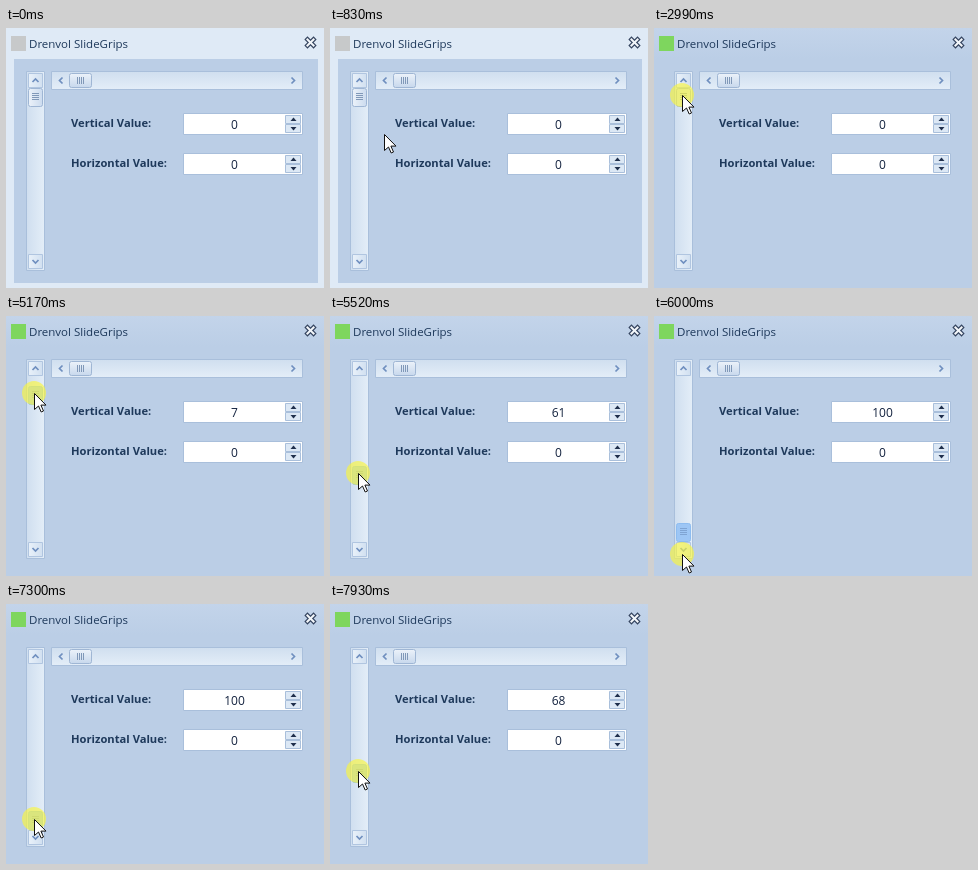
These frames come from a looping animation (318 by 260 pixels, 8 s). An HTML page with a canvas:

```html
<!DOCTYPE html>
<html lang="en">
<head>
<meta charset="utf-8">
<title>Scroll bar demo</title>
<style>
html, body { margin: 0; width: 100%; height: 100%; overflow: hidden; background: #bbcee6; }
canvas { display: block; }
</style>
</head>
<body>
<canvas id="stage" width="318" height="260"></canvas>
<script>
const ctx = document.getElementById('stage').getContext('2d');
const LOOP = 8000, ACTIVATE = 2990, DRAG = 5170;
const THUMB_MIN = 60, TRAVEL = 147;
const FONT = '"Open Sans", "Noto Sans", sans-serif';
const linear = p => p;
const easeOut = p => p * (2 - p);

// Pointer moves: first and last step time, step count, from, to, easing
const moves = [
  [270, 1040, 12, [299, 255], [34, 95], easeOut],
  [1110, 1180, 2, [30, 88], [28, 84], linear],
  [1510, 1650, 3, [28, 78], [28, 68], linear],
  [5170, 5870, 11, [28, 78], [28, 237], linear],
  [6000, 6210, 4, [28, 239], [28, 241], linear],
  [6610, 7300, 10, [28, 241], [28, 216], linear],
  [7370, 7930, 9, [28, 211], [28, 168], linear]
];

function pointerAt(t) {
  const move = moves.filter(m => m[0] <= t).pop();
  if (!move) return null;
  const [start, end, count, from, to, ease] = move;
  const step = Math.floor((t - start) / (end - start) * (count - 1) + 1e-6);
  const p = ease(Math.min(1, step / (count - 1)));
  return from.map((v, i) => Math.round(v + (to[i] - v) * p));
}

function rect(x, y, w, h, fill) {
  ctx.fillStyle = fill;
  ctx.fillRect(x, y, w, h);
}

function framed(x, y, w, h, fill, line, radius = 0) {
  ctx.beginPath();
  ctx.roundRect(x + .5, y + .5, w - 1, h - 1, radius);
  ctx.fillStyle = fill;
  ctx.fill();
  ctx.strokeStyle = line;
  ctx.lineWidth = 1;
  ctx.stroke();
}

function polyline(points, color, width) {
  ctx.beginPath();
  points.forEach(([x, y]) => ctx.lineTo(x, y));
  ctx.strokeStyle = color;
  ctx.lineWidth = width;
  ctx.stroke();
}

function text(str, x, y, size, color, weight = 400, align = 'left') {
  ctx.font = `${weight} ${size}px ${FONT}`;
  ctx.textAlign = align;
  ctx.fillStyle = color;
  ctx.fillText(str, x, y);
}

function gradient(x0, y0, x1, y1, from, to) {
  const g = ctx.createLinearGradient(x0, y0, x1, y1);
  g.addColorStop(0, from);
  g.addColorStop(1, to);
  return g;
}

function chevron(x, y, angle) {
  ctx.save();
  ctx.translate(x, y);
  ctx.rotate(angle);
  polyline([[-3, 1.5], [0, -1.5], [3, 1.5]], '#6f8fbf', 1.7);
  ctx.restore();
}

function verticalBar(thumbY, hover, pressed) {
  framed(20, 43, 19, 200, gradient(20, 0, 39, 0, '#cfdeef', '#e4eef8'), '#a9bfdb');
  const button = gradient(22, 0, 37, 0, '#eaf2fa', '#d0dff0');
  framed(22, 45, 15, 15, button, '#b0c5e0');
  framed(22, 226, 15, 15, button, '#b0c5e0');
  chevron(29.5, 52.5, 0);
  chevron(29.5, 233.5, Math.PI);
  const fill = pressed ? '#9dc6f5' : hover ? '#d0e0f3' : gradient(22, 0, 37, 0, '#edf3fa', '#cadaee');
  framed(22, thumbY, 15, 19, fill, pressed ? '#8dbcf0' : '#9fb6d4', 2);
  for (let i = 0; i < 4; i++) {
    rect(26, thumbY + 5 + i * 2, 7, 1, pressed ? '#7fa4d3' : '#8098b8');
  }
}

function horizontalBar() {
  framed(45, 43, 252, 19, gradient(0, 43, 0, 62, '#cfdeef', '#e4eef8'), '#a9bfdb');
  chevron(55, 52.5, -Math.PI / 2);
  chevron(287, 52.5, Math.PI / 2);
  framed(63, 45, 23, 15, gradient(0, 45, 0, 60, '#edf3fa', '#c6d7ec'), '#9fb6d4', 2);
  for (let i = 0; i < 4; i++) {
    rect(71 + i * 2, 49, 1, 7, '#8098b8');
  }
}

function triangle(x, y, dir) {
  ctx.beginPath();
  ctx.moveTo(x - 3, y + 1.5 * dir);
  ctx.lineTo(x + 3, y + 1.5 * dir);
  ctx.lineTo(x, y - 2 * dir);
  ctx.fillStyle = '#1f2f4c';
  ctx.fill();
}

function field(label, value, y) {
  text(label, 65, y + 14, 11.2, '#1e395b', 700);
  framed(177, y, 120, 22, '#fff', '#a9bfdb');
  framed(279, y + 2, 16, 9, '#dce8f5', '#a9bfdb');
  framed(279, y + 11, 16, 9, '#dce8f5', '#a9bfdb');
  triangle(287.5, y + 6.5, 1);
  triangle(287.5, y + 15.5, -1);
  text(value, 228.5, y + 16, 12, '#14233f', 400, 'center');
}

function closeButton() {
  for (const [color, width, reach] of [['#34445f', 4.4, 4.6], ['#f4f7fb', 2, 3.8]]) {
    polyline([[304.5 - reach, 14.5 - reach], [304.5 + reach, 14.5 + reach]], color, width);
    polyline([[304.5 + reach, 14.5 - reach], [304.5 - reach, 14.5 + reach]], color, width);
  }
}

function drawWindow(active) {
  if (active) {
    rect(0, 0, 318, 260, gradient(0, 0, 0, 31, '#c3d4ea', '#bbcee6'));
  } else {
    rect(0, 0, 318, 260, '#dfeaf6');
    rect(8, 31, 304, 224, '#bbcee6');
  }
  rect(5, 8, 15, 15, active ? '#7ed65e' : '#c7c9ca');
  text('Drenvol SlideGrips', 23, 20, 11.5, '#1e395b');
  closeButton();
}

function drawPointer([x, y], clicked) {
  if (clicked) {
    ctx.beginPath();
    ctx.arc(x, y - 1, 12, 0, Math.PI * 2);
    ctx.fillStyle = 'rgba(250, 246, 60, .65)';
    ctx.fill();
  }
  ctx.beginPath();
  for (const [dx, dy] of [[0, 0], [0, 16], [4, 12.5], [6.7, 18.5], [9, 17.5], [6.4, 11.6], [11.5, 11.6]]) {
    ctx.lineTo(x + dx + .5, y + dy - .5);
  }
  ctx.closePath();
  ctx.fillStyle = '#fff';
  ctx.fill();
  ctx.strokeStyle = '#111';
  ctx.lineWidth = 1;
  ctx.stroke();
}

function draw(t) {
  const active = t >= ACTIVATE, dragging = t >= DRAG;
  const pointer = pointerAt(t);
  const offset = dragging ? Math.max(0, Math.min(TRAVEL, pointer[1] - 8 - THUMB_MIN)) : 0;
  const hover = pointer !== null && pointer[0] < 39;
  drawWindow(active);
  verticalBar(THUMB_MIN + offset, hover, dragging);
  horizontalBar();
  field('Vertical Value:', Math.round(offset / TRAVEL * 100), 85);
  field('Horizontal Value:', 0, 125);
  if (pointer) drawPointer(pointer, active);
}

const begin = performance.now();
function tick() {
  draw((performance.now() - begin) % LOOP);
  requestAnimationFrame(tick);
}
tick();
</script>
</body>
</html>
```
